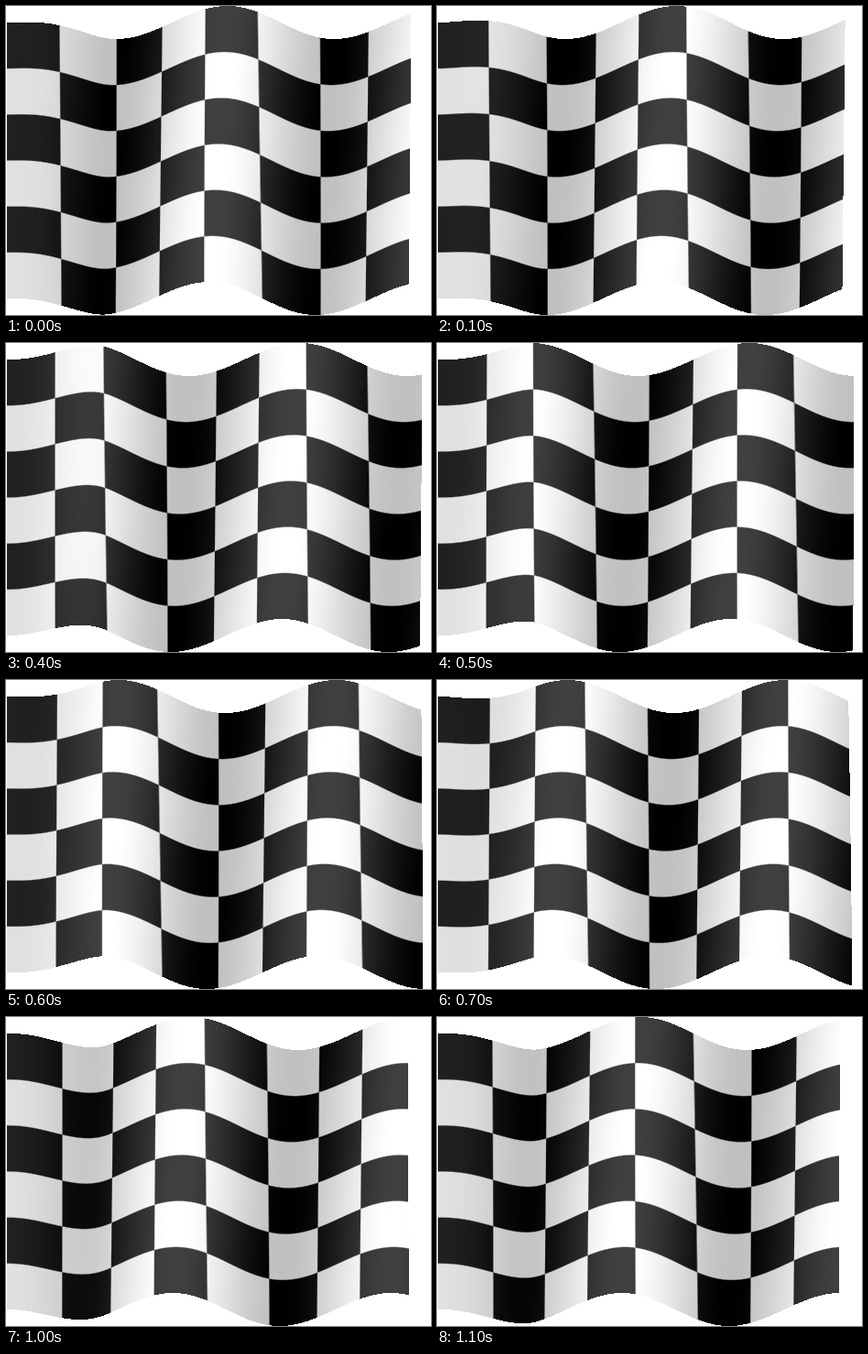
Recreate the animation shown at these times as an HTML page with a canvas. Size 464 by 337 pixels, loop 1.2 s.

```html
<!DOCTYPE html>
<html lang="en">
<head>
<meta charset="utf-8">
<title>Waving chequered flag</title>
<style>
  html, body { margin: 0; width: 100%; height: 100%; overflow: hidden; background: #fff; }
  canvas { display: block; }
</style>
</head>
<body>
<canvas id="flag" width="464" height="337"></canvas>
<script>
const STEPS = 12, STEP_MS = 100;
const COLS = 8, ROWS = 6;
const LEFT = 1.4, TOP = 18, WIDTH = 445.6, HEIGHT = 301;
const CELL_W = WIDTH / COLS, CELL_H = HEIGHT / ROWS;
const WAVE = { length: 238, trough: 121.5, dx: 8, dy: 18, shade: 32, ramp: 112, poleLag: 1.7 };

const canvas = document.getElementById('flag');
const ctx = canvas.getContext('2d');
const image = ctx.createImageData(canvas.width, canvas.height);
const clamp = (v, lo, hi) => Math.min(hi, Math.max(lo, v));

function smoothstep(v) {
  const t = clamp(v, 0, 1);
  return t * t * (3 - 2 * t);
}

// Alternates between +1 and -1 per cell, softened across inner boundaries
function stripe(pos, size, count) {
  const n = clamp(Math.round(pos / size), 1, count - 1);
  const side = clamp((pos - n * size) * 1.5, -1, 1);
  return n % 2 ? -side : side;
}

function draw(step) {
  const { width, height, data } = image;
  data.fill(255);
  for (let py = 0, i = 0; py < height; py++) {
    const y = py + 0.5;
    // The lower part of the cloth trails by up to one step
    const rowStep = step - (y - TOP) / HEIGHT;
    for (let px = 0; px < width; px++, i += 4) {
      const x = px + 0.5;
      // Near the pole the cloth swings less and later
      const freedom = smoothstep((x - LEFT) / WAVE.ramp);
      const lag = WAVE.poleLag * (1 - freedom);
      const phase = (rowStep - lag) / STEPS - (x - WAVE.trough) / WAVE.length;
      const swing = freedom * Math.cos(2 * Math.PI * phase);
      const u = x - LEFT - WAVE.dx * swing;
      const v = y - TOP - WAVE.dy * swing;
      if (u < 0 || u > WIDTH || v < 0 || v > HEIGHT) continue;
      const check = stripe(u, CELL_W, COLS) * stripe(v, CELL_H, ROWS);
      data[i] = data[i + 1] = data[i + 2] = 128 - 96 * check - WAVE.shade * swing;
    }
  }
  ctx.putImageData(image, 0, 0);
}

const start = performance.now();
let shown = -1;
function tick() {
  const step = Math.floor((performance.now() - start) / STEP_MS) % STEPS;
  if (step !== shown) draw(shown = step);
  requestAnimationFrame(tick);
}
tick();
</script>
</body>
</html>
```
